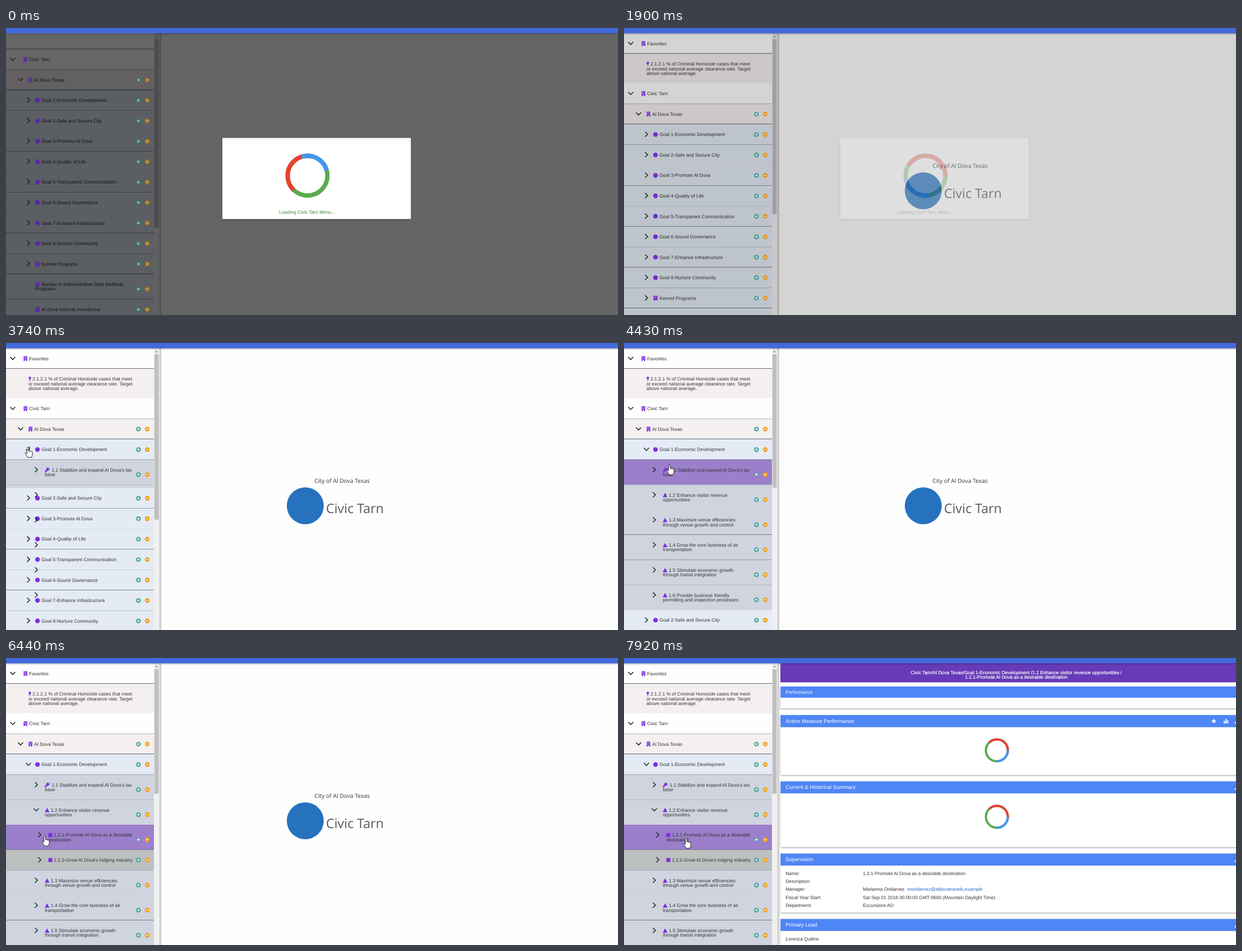
Recreate the animation shown at these times as an HTML page. Size 1092x513 px, loop 8 s.

```html
<!DOCTYPE html>
<html lang="en">
<head>
<meta charset="utf-8">
<title>Menu tree</title>
<style>
html,body{margin:0;width:100%;height:100%;overflow:hidden;background:#fefefe}
svg{display:block;width:100%;height:100%;--d:60%;--i:25%}
text{font:8.45px "Liberation Sans",Arial,sans-serif;fill:#333;white-space:pre;text-rendering:geometricPrecision}
.side text{fill:color-mix(in srgb,#000 var(--d),#333)}
.l0{fill:color-mix(in srgb,#000 var(--d),#fefefe)}
.l1{fill:color-mix(in srgb,#000 var(--d),#f4f0f0)}
.l2{fill:color-mix(in srgb,#000 var(--d),#e4ebf5)}
.l3{fill:#cfd4df}
.l4{fill:#bdc0c1}
.hover .bg{fill:#9b7fca}
.hover .add{opacity:.5}
.rule{fill:color-mix(in srgb,#000 var(--d),#5a626e);shape-rendering:crispEdges}
.icon{fill:color-mix(in srgb,#000 var(--i),#7d2ee2);fill-rule:evenodd}
.add{fill:color-mix(in srgb,#000 var(--i),#3fa799)}
.sub{fill:color-mix(in srgb,#000 var(--i),#f0a01e)}
.glyph{fill:color-mix(in srgb,#000 var(--i),#fff)}
.chev{fill:none;stroke:#222;stroke-width:1.5}
.card{fill:#fff;filter:drop-shadow(0 1px 1.5px #0006)}
.white,text.white{fill:#fff}
text.title{font-size:9.45px}
text.brand{font-family:"Open Sans","Noto Sans",sans-serif}
</style>
</head>
<body>
<svg id="stage" viewBox="0 0 1092 513" preserveAspectRatio="none">
  <defs>
    <linearGradient id="shade" x2="0" y2="1">
      <stop stop-opacity=".28"/><stop offset="1" stop-opacity="0"/>
    </linearGradient>
  </defs>
  <rect width="1092" height="513" fill="#fefefe"/>
  <g id="home">
    <circle cx="534" cy="291" r="33" fill="#2672bf"/>
    <text class="brand" x="550.5" y="250" style="font-size:10.3px">City of Al Dova Texas</text>
    <text class="brand" x="571" y="304" style="font-size:23.3px;fill:#58585a">Civic Tarn</text>
  </g>
  <g id="detail"></g>
  <g id="side" class="side"></g>
  <g id="chevrons"></g>
  <rect x="264" y="9" width="9.5" height="504" fill="#f0f0f0"/>
  <path d="M266 16.5h5l-2.5-3z" fill="#8a8a8a"/>
  <rect id="thumb" x="264.8" y="20" width="7.6" fill="#bfbfbf"/>
  <rect x="273.5" y="9" width="3.6" height="504" fill="#d0d0d0"/>
  <rect id="dim" x="264" y="9" width="828" height="504"/>
  <rect y="9" width="1092" height="4" fill="url(#shade)"/>
  <rect width="1092" height="9.5" fill="#4369df"/>
  <g id="modal">
    <rect class="card" x="386" y="196.5" width="336.5" height="145" rx="1"/>
    <text x="487.6" y="331.6" style="fill:#40803f">Loading Civic Tarn Menu...</text>
  </g>
  <g id="cursor" fill="#fff" stroke="#111" stroke-width=".9" stroke-linejoin="round">
    <path id="arrow" d="M0 0v11.5l2.7-2.5 1.8 4.2 1.8-.8-1.8-4.1h3.7z"/>
    <path id="hand" d="M-1.4 1.2a1.4 1.4 0 0 1 2.8 0v5.3l5 .9q1.8 .5 1.8 2.2v3.6l-1.5 4.8h-7l-4.4-7q-.6-1.8 1.2-1.6l2.1 2z"/>
  </g>
</svg>
<script>
const LOOP = 8000, TOP = 9.4;
const $ = id => document.getElementById(id);
const clamp = x => Math.min(1, Math.max(0, x));
const easeInOut = x => x < .5 ? 2 * x * x : 1 - 2 * (1 - x) ** 2;
const smooth = x => x * x * (3 - 2 * x);

function add(parent, tag, attrs = {}, html = '') {
  const el = document.createElementNS('http://www.w3.org/2000/svg', tag);
  for (const k in attrs) el.setAttribute(k, attrs[k]);
  el.innerHTML = html;
  parent.append(el);
  return el;
}
const show = (el, on) => { el.style.display = on ? '' : 'none'; };

// Menu tree

const ICONS = {
  building: 'M0-4.3h6.4v8.8h-2.2v-2.2h-2v2.2H0zM1.3-3h1.2v1.3H1.3zM3.9-3h1.2v1.3H3.9zM1.3-.5h1.2v1.3H1.3zM3.9-.5h1.2v1.3H3.9z',
  dot: 'M0 0a4.2 4.2 0 0 1 8.4 0a4.2 4.2 0 0 1-8.4 0z',
  box: 'M0-4h8.4v2H0zM.5-1.5h7.4v5.5H.5zM2.9-.6v1h2.6v-1z',
  triangle: 'M4-4l4.2 7.8H-.2z',
  square: 'M.2-3.6h7v7.2h-7z',
  key: 'M2.9-1.7a2.7 2.7 0 1 1 2.7 2.8l-1 .9H3.5v1.2H2.2v1.2H0V2.6zM5.6-2.7a.8 .8 0 1 0 1.6 0a.8 .8 0 1 0-1.6 0z',
  pin: 'M.2-1.6a2.3 2.3 0 1 1 2.9 2.1v3.7h-1.2V.5A2.3 2.3 0 0 1 .2-1.6z'
};
// chevron x, icon x, text x by level
const COLS = [[12, 31.5, 41.3], [26, 40.5, 50.3], [40, 52, 63.3], [54, 69.3, 80], [60, 75.5, 85.5]];
const node = (level, icon, text, opts = {}) => ({ level, icon, lines: text.split('|'), ...opts });

const goals = ['Safe and Secure City', 'Promote Al Dova', 'Quality of Life', 'Transparent Communication',
  'Sound Governance', 'Enhance Infrastructure', 'Nurture Community'];
const favorites = node(0, 'building', 'Favorites', { open: true });
const pinned = node(1, 'pin', '2.1.2.1 % of Criminal Homicide cases that meet|or exceed national average clearance rate. Target|above national average.',
  { cols: [0, 40, 47.3], leaf: true, plain: true, height: 52.9 });
const tree = [
  favorites, pinned,
  node(0, 'building', 'Civic Tarn', { open: true }),
  node(1, 'building', 'Al Dova Texas', { open: true }),
  node(2, 'dot', 'Goal 1-Economic Development', { at: 3590, lag: 59, kids: [
    node(3, 'key', "1.1 Stabilize and expand Al Dova's tax|base", { cols: [54, 69.3, 81.5] }),
    node(3, 'triangle', '1.2 Enhance visitor revenue|opportunities', { at: 5065, lag: 56, kids: [
      node(4, 'square', '1.2.1-Promote Al Dova as a desirable|destination'),
      node(4, 'square', "1.2.2-Grow Al Dova's lodging industry")
    ] }),
    node(3, 'triangle', '1.3 Maximize venue efficiencies|through venue growth and control'),
    node(3, 'triangle', '1.4 Grow the core business of air|transportation'),
    node(3, 'triangle', '1.5 Stimulate economic growth|through transit integration'),
    node(3, 'triangle', '1.6 Provide business friendly|permitting and inspection processes')
  ] }),
  ...goals.map((g, i) => node(2, 'dot', `Goal ${i + 2}-${g}`)),
  node(2, 'box', 'Kennel Programs'),
  node(2, 'box', 'Bureau of Administrative Data Methods|Programs', { leaf: true }),
  node(2, 'box', 'Al Dova Intercity Aerodrome', { leaf: true })
];

const rows = [];
function build(list) {
  for (const r of list) {
    const n = r.lines.length, [cx, ix, tx] = r.cols || COLS[r.level];
    r.h = r.height || 36.55 + (n - 1) * 8.2;
    r.chevX = cx;
    r.el = add($('side'), 'g');
    r.bg = add(r.el, 'rect', { class: `bg l${r.level}`, width: 264, height: r.h + .3 });
    r.body = add(r.el, 'g');
    add(r.body, 'path', { class: 'icon', d: ICONS[r.icon], transform: `translate(${ix} 18.4)` });
    r.lines.forEach((s, i) => add(r.body, 'text', { x: i ? ix : tx, y: 21.4 + i * 8.2 }, s));
    if (r.level && !r.plain) {
      const y = 18.5 + (n - 1) * 8.2;
      const badge = (x, cls, d) => {
        const g = add(r.body, 'g', { transform: `translate(${x} ${y})` });
        add(g, 'circle', { class: cls, r: 4.2 });
        add(g, 'path', { class: 'glyph', d });
      };
      badge(236.3, 'add', 'M-2.4-.6h1.8v-1.8H.6v1.8h1.8V.6H.6v1.8H-.6V.6h-1.8z');
      badge(252, 'sub', 'M-2.3-.6h4.6V.6h-4.6z');
    }
    if (!r.plain) r.rule = add(r.el, 'rect', { class: 'rule', y: r.h - .5, width: 264, height: 1 });
    if (!r.leaf) r.chev = add($('chevrons'), 'path', { class: 'chev', d: 'M-2.4-4.5L2.2 0L-2.4 4.5' });
    rows.push(r);
    if (r.kids) build(r.kids);
  }
}
build(tree);

function layout(list, y, t, on = true) {
  for (const r of list) {
    const visible = on && !(r === pinned && t < 1650);
    const blank = r === favorites && t < 1650;
    r.y = y;
    r.on = visible;
    show(r.el, visible);
    r.el.setAttribute('transform', `translate(0 ${y})`);
    show(r.body, !blank);
    const h = blank ? 28.4 : r.h;
    if (r.rule) r.rule.setAttribute('y', h - .5);
    if (r.chev) {
      show(r.chev, visible && !blank);
      const turn = r.open ? 1 : r.at ? easeInOut(clamp((t - r.at) / 300)) : 0;
      r.chev.setAttribute('transform', `translate(${r.chevX} ${y + 18}) rotate(${90 * turn})`);
    }
    if (visible) y += h;
    if (r.kids) {
      const p = easeInOut(clamp((t - r.at - r.lag) / 300));
      y += (layout(r.kids, y, t, on && p > 0) - y) * p;
    }
  }
  return y;
}

// Spinners: red and blue arcs turning at their own speeds over a green ring

function spinner(parent, x, y, r, width, t0, blue0, red0) {
  const arc = (stroke, len) => add(parent, 'circle', {
    cx: x, cy: y, r, fill: 'none', stroke, 'stroke-width': width,
    pathLength: 360, 'stroke-dasharray': `${len} ${360 - len}`
  });
  add(parent, 'circle', { cx: x, cy: y, r, fill: 'none', stroke: '#5aaa4e', 'stroke-width': width });
  const red = arc('#e8402f', 150), blue = arc('#4296f2', 91);
  return t => {
    const s = (t - t0) / 1000;
    const turn = (el, a) => el.setAttribute('transform', `rotate(${a - 90} ${x} ${y})`);
    turn(red, red0 + 419.9 * s);
    turn(blue, blue0 + 289.4 * s);
  };
}

// Detail page

const detail = $('detail');
const say = (x, y, s, attrs) => add(detail, 'text', { x, y, ...attrs }, s);
const mid = { class: 'white', 'text-anchor': 'middle', stroke: '#fff', 'stroke-width': .2 };
add(detail, 'rect', { x: 279, y: 9, width: 813, height: 34.5, fill: '#673ab7' });
say(700, 28.5, 'Civic Tarn/Al Dova Texas/Goal 1-Economic Development /1.2 Enhance visitor revenue opportunities /', mid);
say(700, 36.5, '1.2.1-Promote Al Dova as a desirable destination', mid);

function card(y, head, bottom, title, cls) {
  add(detail, 'rect', { class: 'card', x: 279.3, y, width: 820, height: bottom - y });
  add(detail, 'rect', { x: 279.3, y, width: 820, height: head, fill: '#4f86f6' });
  say(288.3, y + head / 2 + 3.1, title, { class: `white ${cls}` });
  if (cls) add(detail, 'path', { class: 'white', d: `M1089 ${y + 15}l3-4v4z` });
}
card(51, 20, 90, 'Performance', '');
card(102, 21.7, 209, 'Action Measure Performance', 'title');
card(220.5, 21.5, 338, 'Current &amp; Historical Summary', 'title');
card(349.5, 21.5, 455, 'Supervision', 'title');
card(466.5, 21.5, 530, 'Primary Lead', 'title');
add(detail, 'path', { class: 'white', d: 'M1052.4 108.3l1.2 3 3.2.2-2.5 2.1.8 3.1-2.7-1.7-2.7 1.7.8-3.1-2.5-2.1 3.2-.2zM1070 112.5h2v4.4h-2zM1073 108.7h2v8.2h-2zM1076 111h2v5.9h-2z' });
[
  ['Name:', '1.2.1-Promote Al Dova as a desirable destination'],
  ['Description:', ''],
  ['Manager:', 'Marianna Ondarvez'],
  ['Fiscal Year Start:', 'Sat Sep 01 2018 00:00:00 GMT-0600 (Mountain Daylight Time)'],
  ['Department:', 'Excursions AD']
].forEach(([label, value], i) => {
  const y = 388 + i * 14.2;
  say(288.5, y, label);
  say(426.2, y, value);
});
say(505.5, 416.4, 'mondarvez@aldovatravels.example', { style: 'fill:#2b66cc' });
say(288.5, 505, 'Lorenza Quilmo');

const spinners = [
  spinner($('modal'), 538, 264, 35.5, 7.8, 0, -17, 224),
  spinner(detail, 665.3, 165, 19.6, 4, 7920, 90, 315),
  spinner(detail, 665.3, 283.8, 19.6, 4, 7920, 90, 315)
];

// Pointer: time, x, y
const PATH = [
  [1880, 1036, 528], [2040, 1023, 506], [2600, 185, 258], [2900, 120, 226], [3360, 39, 186.4],
  [4110, 39, 186.4], [4300, 72, 199], [4580, 92, 240], [4850, 56, 272], [5640, 56, 272],
  [5850, 74, 285], [6130, 62, 313], [6380, 62, 313], [6440, 69, 318], [6600, 104, 316],
  [6980, 104, 316], [7250, 111, 322]
];
function pointer(t) {
  const i = PATH.findIndex(k => k[0] > t);
  if (i < 0) return PATH[PATH.length - 1].slice(1);
  if (!i) return PATH[0].slice(1);
  const [t0, x0, y0] = PATH[i - 1], [t1, x1, y1] = PATH[i];
  const p = smooth((t - t0) / (t1 - t0));
  return [x0 + (x1 - x0) * p, y0 + (y1 - y0) * p];
}

function render(t) {
  const end = layout(tree, TOP, t);
  $('thumb').setAttribute('height', 269600 / (end + 279));

  const veil = (1 - clamp((t - 1735) / 400)) ** 2.4;
  $('stage').style.setProperty('--d', 60 * veil + '%');
  $('stage').style.setProperty('--i', 25 * veil + '%');
  $('dim').setAttribute('opacity', .6 * veil);
  $('modal').setAttribute('opacity', veil);
  show($('modal'), veil > 0);

  show($('home'), t < 6980);
  show(detail, t >= 6980);
  spinners.forEach(spin => spin(t));

  const [x, y] = pointer(t);
  $('cursor').setAttribute('transform', `translate(${x} ${y})`);
  show($('hand'), x < 264);
  show($('arrow'), x >= 264);
  for (const r of rows) {
    const over = r.on && x < 264 && x > r.chevX + 6 && y >= r.y && y < r.y + r.h;
    r.el.setAttribute('class', over ? 'hover' : '');
  }
}

const start = performance.now();
function tick() {
  render((performance.now() - start) % LOOP);
  requestAnimationFrame(tick);
}
tick();
</script>
</body>
</html>
```
